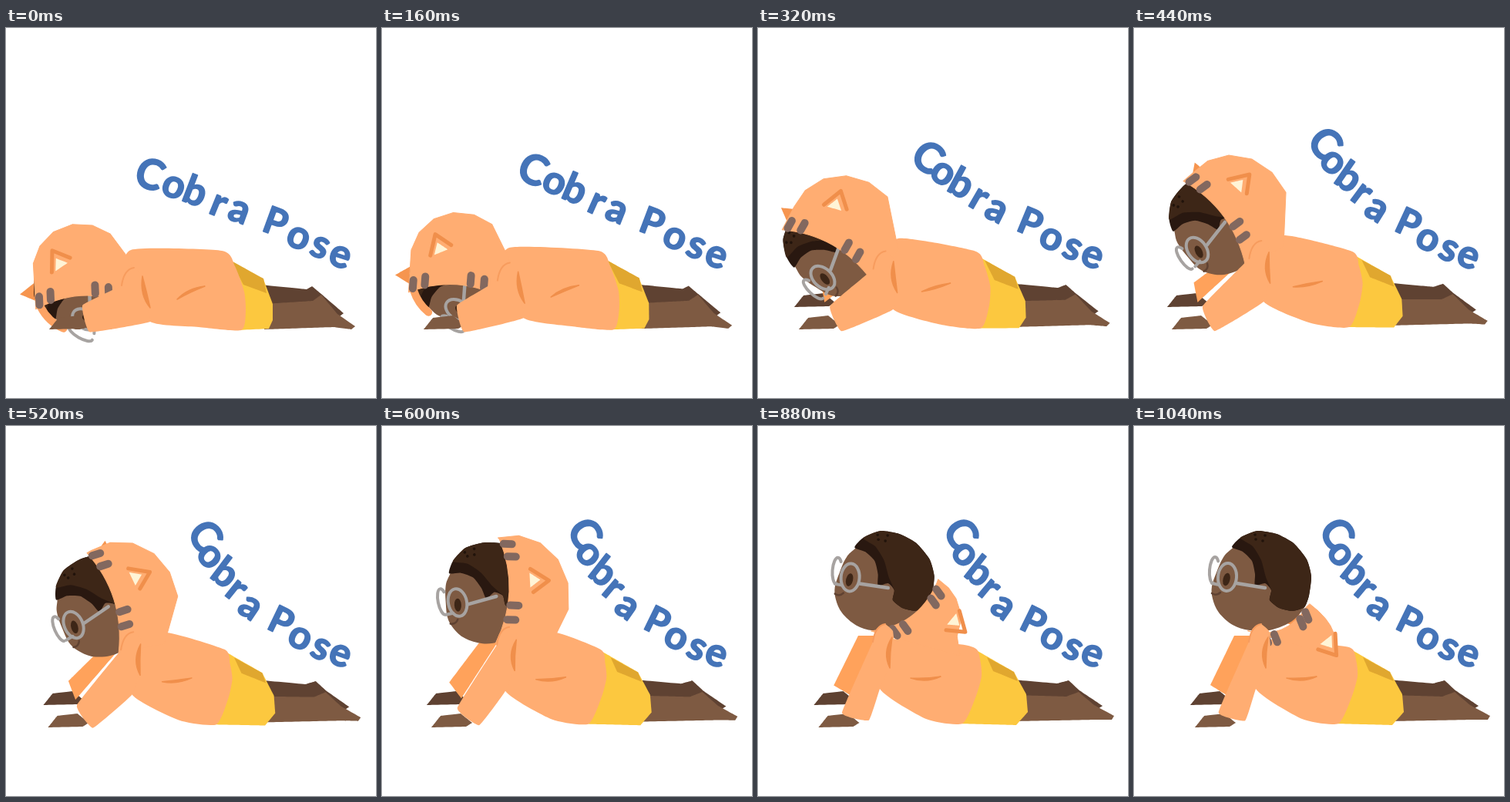
These frames come from a looping animation (480x480 px, 6.72 s). An HTML page with a canvas:

```html
<!DOCTYPE html>
<html lang="en">
<head>
<meta charset="utf-8">
<title>Cobra Pose</title>
<style>
html, body { margin: 0; width: 100%; height: 100%; overflow: hidden; background: #fff; }
canvas { display: block; width: 480px; height: 480px; }
</style>
</head>
<body>
<canvas id="stage" width="480" height="480"></canvas>
<script>
const ctx = document.getElementById('stage').getContext('2d');
const LOOP = 6720, STEP = 40, RAD = Math.PI / 180;
const ORANGE = '#ffad72', FOLD = '#f08f4b', SKIN = '#7e5a42', DARK = '#5f4232';
const HAIR = '#3d2617', GREY = '#a7a3a1', WHISKER = '#82685f', BLUE = '#4574b8';

// Joints that drive the figure, given at TIMES
const TIMES = [0, 160, 320, 440, 600, 720, 1040];
const DRIFT = [0, 0.12, 0.4, 0.65, 0.93, 1, 1];
const BEND = [0, 0.12, 0.44, 0.8, 1, 1, 1];
const HEAD = { // near lens and turn of the head
  x: [103, 99, 84, 82, 98, 116, 121],
  y: [378, 366, 324, 288, 229, 198, 196],
  deg: [-100, -95, -79, -61, -25, -2, 0]
};
const HOOD = { // rim angle, reach at the nape, ear angle and distance
  rim: [-107, -103, -84, -68, -54, -36, 31],
  reach: [76, 80, 95, 98, 105, 115, 121],
  ear: [-31, -24, -2, 6, 15, 18, 45],
  far: [60, 62, 71, 75, 78, 100, 138]
};
const NAPE = { x: [162, 165, 182, 194, 220, 252, 266], y: [288, 285, 273, 269, 267, 279, 285] };
const CUFF = { x: [104, 102, 101, 97, 112, 125, 127], deg: [75, 75, 65, 64, 38, 14, 17] };
const CROWN = [44, 4], CUFF_Y = 377;

// Outlines at rest and raised
const backLeg = [
  [330,333, 390,339, 397,335, 409,345, 438,370, 433,374, 400,358, 335,358],
  [330,329, 388,334, 403,330, 417,343, 447,363, 441,367, 410,352, 335,352]];
const frontLeg = [
  [335,358, 398,354, 409,346, 430,371, 453,387, 448,391, 425,388, 335,391],
  [335,349, 400,351, 416,345, 436,362, 462,376, 459,381, 436,381, 335,383]];
const shorts = [
  [290,301, 334,326, 346,358, 346,379, 341,390, 300,392],
  [280,289, 332,319, 348,348, 350,371, 335,388, 260,386]];
const shade = [
  [292,302, 334,325, 338,344, 308,333],
  [297,300, 332,319, 337,331, 305,318]];
const back = [
  [280,289, 297,309, 309,342, 311,368, 305,392, 250,388],
  [284,290, 289,308, 290,325, 283,350, 265,386, 218,380]];
const armpit = [[187,381], [158,341]];
const shoulder = [[164,326], [163,272]];
const armFold = [[13,-4, 14,19, 23,37], [11,2, 3,22, 8,42]];
const sideFold = [[222,352, 237,340, 258,335], [198,327, 218,331, 237,325]];

const hand = [-48,14, -36,-1, -10,-4, 5,8, -3,13];
// Head outlines around the near lens
const skull = [5,-36, -6,-24, -14,-6, -20,12, -19,28, -11,46, 7,62, 29,69, 59,68, 90,52, 104,20, 80,-35, 39,-59];
const nape = [39,-60, 64,-56, 86,-44, 103,-23, 109,-1, 106,24, 100,39, 84,44, 67,40, 55,30, 57,17];
const hair = [6,-39, 17,-51, ...nape, 49,8, 36,11, 36,-4, 32,-21, 20,-33];
const hairTop = [17,-51, ...nape, 50,0, 44,-22, 33,-40];

// glyph, size, then x, y, angle before and after the bend
const letters = [
  ['C', 54, [187,189,20], [264,139,58]],
  ['o', 51, [217,207,22], [267,167,46]],
  ['b', 51, [246,211,21], [288,188,38]],
  ['r', 51, [275,231,22], [299,213,40]],
  ['a', 51, [302,239,20], [317,236,35]],
  ['P', 48, [350,251,20], [358,253,26]],
  ['o', 51, [379,273,22], [381,276,27]],
  ['s', 51, [407,285,22], [408,290,25]],
  ['e', 51, [433,297,18], [433,298,20]]];

// Monotone cubic through the values at TIMES
function ease(v, t) {
  const last = TIMES.length - 1;
  if (t >= TIMES[last]) return v[last];
  let i = 0;
  while (t >= TIMES[i + 1]) i++;
  const slope = k => (v[k + 1] - v[k]) / (TIMES[k + 1] - TIMES[k]);
  const tangent = k => {
    if (k === 0 || k === last) return 0;
    const a = slope(k - 1), b = slope(k);
    return a * b > 0 ? 2 * a * b / (a + b) : 0;
  };
  const h = TIMES[i + 1] - TIMES[i], u = (t - TIMES[i]) / h, w = 1 - u;
  return v[i] * w * w * (1 + 2 * u) + v[i + 1] * u * u * (3 - 2 * u)
    + h * u * w * (w * tangent(i) - u * tangent(i + 1));
}

const joint = (keys, t) =>
  Object.fromEntries(Object.entries(keys).map(([name, v]) => [name, ease(v, t)]));
const mix = (a, b, p) => a.map((v, i) => v + (b[i] - v) * p);
const shift = (p, x, y) => p.map((v, i) => v + (i % 2 ? y : x));
const polar = (r, deg, [x, y] = CROWN) => [x + r * Math.cos(deg * RAD), y + r * Math.sin(deg * RAD)];

function fill(p, color, round = 0) {
  const n = p.length / 2, at = i => [p[(i + n) % n * 2], p[(i + n) % n * 2 + 1]];
  const s = round / 6;
  ctx.beginPath();
  ctx.moveTo(p[0], p[1]);
  for (let i = 0; i < n; i++) {
    const [a, b, c, d] = [at(i - 1), at(i), at(i + 1), at(i + 2)];
    ctx.bezierCurveTo(b[0] + (c[0] - a[0]) * s, b[1] + (c[1] - a[1]) * s,
      c[0] - (d[0] - b[0]) * s, c[1] - (d[1] - b[1]) * s, c[0], c[1]);
  }
  ctx.fillStyle = color;
  ctx.fill();
}

function stroke(color, width) {
  ctx.strokeStyle = color;
  ctx.lineWidth = width;
  ctx.stroke();
}

function curve([x1, y1, cx, cy, x2, y2], color, width) {
  ctx.beginPath();
  ctx.moveTo(x1, y1);
  ctx.quadraticCurveTo(cx, cy, x2, y2);
  stroke(color, width);
}

// Crease that tapers at both ends
function leaf([x1, y1, cx, cy, x2, y2], width) {
  const len = Math.hypot(x2 - x1, y2 - y1);
  const nx = (y1 - y2) / len * width, ny = (x2 - x1) / len * width;
  ctx.beginPath();
  ctx.moveTo(x1, y1);
  ctx.quadraticCurveTo(cx + nx, cy + ny, x2, y2);
  ctx.quadraticCurveTo(cx - nx, cy - ny, x1, y1);
  ctx.fillStyle = FOLD;
  ctx.fill();
  stroke(FOLD, 1.5);
}

function line(p, color, width) {
  ctx.beginPath();
  for (let i = 0; i < p.length; i += 2) ctx.lineTo(p[i], p[i + 1]);
  stroke(color, width);
}

function oval(x, y, rx, ry, turn, from = 0, to = 2 * Math.PI) {
  ctx.beginPath();
  ctx.ellipse(x, y, rx, ry, turn, from, to);
}

function dot(x, y, rx, ry, turn, color) {
  oval(x, y, rx, ry, turn);
  ctx.fillStyle = color;
  ctx.fill();
}

function placed(x, y, deg, draw) {
  ctx.save();
  ctx.translate(x, y);
  ctx.rotate(deg * RAD);
  draw();
  ctx.restore();
}

function face(tilt) {
  fill(skull, SKIN, 1);
  fill(hair, '#291810', .6);
  fill(hairTop, HAIR, .6);
  for (const [x, y] of [[36,-55], [46,-47], [37,-49], [49,-54]]) dot(x, y, 1.8, 1.8, 0, '#21130b');
  curve([-20,21, -14,25, -9,20], DARK, 2.5);
  dot(-1, 3, 4.5, 8.5, tilt + .15, HAIR);
}

function glasses(tilt) {
  oval(-17, -9, 6, 17, tilt, Math.PI * .5, Math.PI * 1.75);
  stroke(GREY, 4);
  line([-20,8, -11,10], GREY, 4);
  oval(0, 0, 12, 18, tilt);
  stroke(GREY, 4);
  line([12,8, 49,14], GREY, 4.5);
}

function head({ x, y, deg }) {
  const tilt = .08 - deg * RAD * .35;
  ctx.save();
  ctx.beginPath();
  ctx.rect(0, 0, 480, 391);
  ctx.clip();
  placed(x, y, deg, () => face(tilt));
  ctx.restore();
  placed(x, y, deg, () => glasses(tilt));
}

function farEar(hood) {
  const angle = hood.rim + 19;
  placed(...polar(82, angle), angle, () => fill([0,0, -22,-13, -22,13], '#f6954f'));
}

function nearEar(hood) {
  placed(...polar(hood.far, hood.ear), hood.ear + 10, () => {
    line([-24,-15, 0,0, -20,15], FOLD, 5);
    fill([-25,-10, -11,-1, -24,9], '#fff4d6');
  });
}

// The rim is a bowed chord of the skull; the rest swells from it to the nape.
function hoodShape(hood, base, p) {
  const a = polar(68, hood.rim), b = polar(68, 122 - 17 * p ** 3);
  const dx = b[0] - a[0], dy = b[1] - a[1], len = Math.hypot(dx, dy);
  const nx = dy / len, ny = -dx / len;
  const c = [(a[0] + b[0]) / 2 + nx * 30, (a[1] + b[1]) / 2 + ny * 30];
  const rimAt = u => a.map((v, i) => v * (1 - u) ** 2 + c[i] * 2 * u * (1 - u) + b[i] * u * u);

  if (hood.rim < -84) { // far side of the opening
    const sweep = (-84 - hood.rim) * 1.7;
    oval(...CROWN, 61, 61, 0, (hood.rim - sweep) * RAD, hood.rim * RAD);
    stroke('#fda364', 10);
  }
  ctx.beginPath();
  ctx.moveTo(...a);
  const from = Math.max(-56, hood.rim - 5), steps = 5;
  for (let i = 0; i <= steps; i++) {
    const u = i / steps;
    const r = 70 + (hood.reach - 70) * u + 7 * Math.sin(Math.PI * u);
    ctx.lineTo(...polar(r, from + (38 - from) * u));
  }
  ctx.lineTo(...base);
  ctx.lineTo(...b);
  ctx.quadraticCurveTo(...c, ...a);
  ctx.fillStyle = ORANGE;
  ctx.fill();
  stroke(ORANGE, 1);

  nearEar(hood);
  for (const u of [.04, .16, .63, .77]) {
    const [x, y] = rimAt(u);
    placed(x + nx * 8, y + ny * 8, Math.atan2(ny, nx) / RAD, () => line([-5,0, 6,0], WHISKER, 10));
  }
}

function title(t) {
  const p = ease(BEND, t);
  ctx.textAlign = 'center';
  ctx.fillStyle = BLUE;
  for (const [glyph, size, from, to] of letters) {
    const mid = 'CPb'.includes(glyph) ? .36 : .255;
    placed(...mix(from, to, p), () => {
      ctx.font = `700 ${size}px Lato, sans-serif`;
      ctx.fillText(glyph, 0, mid * size);
      ctx.strokeStyle = BLUE;
      ctx.lineWidth = 1.8;
      ctx.strokeText(glyph, 0, mid * size);
    });
  }
}

function draw(t) {
  const p = ease(DRIFT, t);
  const part = ([low, high]) => mix(low, high, p);
  const skullAt = joint(HEAD, t), hood = joint(HOOD, t), neck = joint(NAPE, t), cuff = joint(CUFF, t);
  const [sx, sy] = part(shoulder), pit = part(armpit);
  const cuffEnds = (x, y, half, deg) => [...polar(half, deg, [x, y]), ...polar(-half, deg, [x, y])];
  const onHead = draw => placed(skullAt.x, skullAt.y, skullAt.deg, draw);

  ctx.fillStyle = '#fff';
  ctx.fillRect(0, 0, 480, 480);
  ctx.lineCap = ctx.lineJoin = 'round';
  title(t);
  fill(part(backLeg), DARK);
  fill(part(frontLeg), SKIN);
  fill(part(shorts), '#fcc83f');
  fill(part(shade), '#e0a72f');

  const farX = cuff.x - 6, farY = CUFF_Y - 29;
  fill(shift(hand, farX, farY), DARK);
  fill([sx - 33, sy, sx - 10, sy, ...cuffEnds(farX - 11, farY - 5, 13, cuff.deg + 15)], '#ffa25b');
  fill([neck.x, neck.y, ...part(back), ...pit, sx - 10, sy + 6], ORANGE, .6);

  onHead(() => farEar(hood));
  head(skullAt);
  const dx = neck.x - skullAt.x, dy = neck.y + 15 - skullAt.y;
  const c = Math.cos(skullAt.deg * RAD), s = Math.sin(skullAt.deg * RAD);
  onHead(() => hoodShape(hood, [dx * c + dy * s, dy * c - dx * s], p));

  fill(shift(hand, cuff.x, CUFF_Y), SKIN);
  const top = shift([-14,8, -9,-9, 2,-15, 12,-6, 14,24], sx, sy);
  fill([...top, ...pit, ...cuffEnds(cuff.x, CUFF_Y, 18, cuff.deg)], ORANGE, .3);
  curve(shift([-14,8, -11,-13, 2,-15], sx, sy), '#f79c5e', 2);
  leaf(shift(part(armFold), sx, sy), 5);
  leaf(part(sideFold), 3);
}

const start = performance.now();
function tick() {
  const t = (performance.now() - start) % LOOP;
  draw(Math.floor(t / STEP) * STEP);
  requestAnimationFrame(tick);
}
tick();
</script>
</body>
</html>
```
